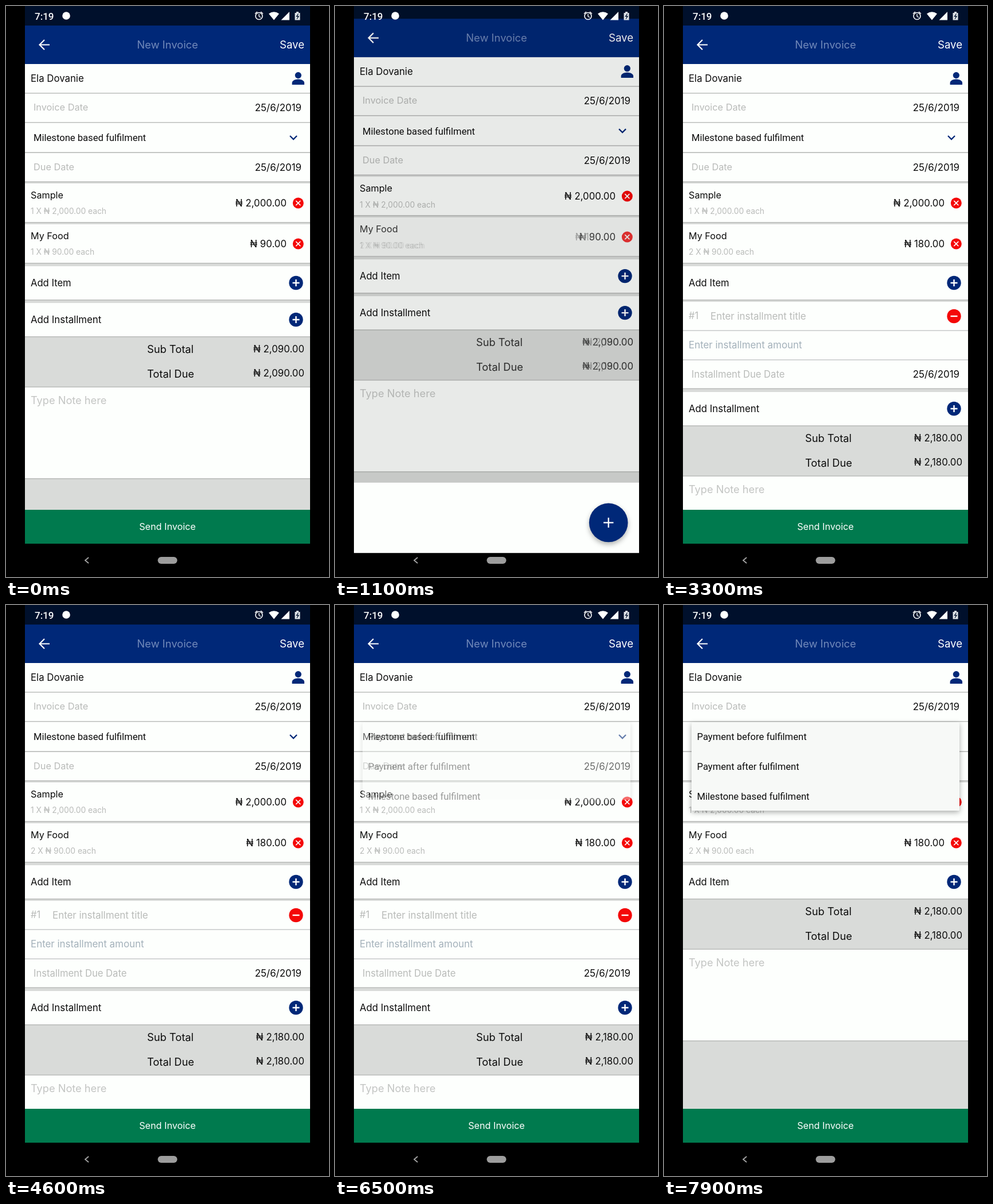
Animation of 563 by 994 pixels, one loop 8 s. Source, as an HTML page:

```html
<!DOCTYPE html>
<html lang="en">
<head>
<meta charset="utf-8">
<title>New Invoice</title>
<style>
  html, body { margin: 0; width: 100%; height: 100%; overflow: hidden; background: #000; }
  svg { display: block; width: 100vw; height: 100vh; }
  text { font-family: Inter, "Open Sans", sans-serif; white-space: pre; }
  .rb { font-family: Roboto, "Noto Sans", sans-serif; }
  .pop { filter: drop-shadow(0 3px 5px rgba(0, 0, 0, .32)); }
  .fab { filter: drop-shadow(0 4px 4px rgba(0, 0, 0, .3)); }
</style>
</head>
<body>
<svg id="stage" viewBox="0 0 563 994"></svg>
<script>
const LOOP = 8000, H = 994;
const NAVY = '#002878', RED = '#f40808', GREEN = '#007a4e', PAPER = '#fdfffd',
      GREY = '#d9dbd9', LINE = '#bcbebc', HINT = '#b9bbb9';

// --- drawing helpers, all return markup ---
const rect = (x, y, w, h, fill, more = '') =>
  `<rect x="${x}" y="${y}" width="${w}" height="${h}" fill="${fill}" ${more}/>`;
const disc = (x, y, r, fill) => `<circle cx="${x}" cy="${y}" r="${r}" fill="${fill}"/>`;
const line = (d, color, w, more = '') =>
  `<path d="${d}" fill="none" stroke="${color}" stroke-width="${w}" ${more}/>`;
const group = (id, body, more = '') => `<g id="${id}" ${more}>${body}</g>`;
// cy is the middle of the capital letters
const text = (x, cy, s, size = 16.6, fill = '#0c0c0c', anchor = 'start', more = '') =>
  `<text x="${x}" y="${(cy + size * .36).toFixed(2)}" font-size="${size}" fill="${fill}" text-anchor="${anchor}" ${more}>${s}</text>`;
const right = (x, cy, s, size) => text(x, cy, s, size, '#0c0c0c', 'end');
const roboto = (x, cy, s, id = '') => text(x, cy, s, 16.6, '#0c0c0c', 'start', `class="rb" ${id}`);
const row = (y, h, edge = LINE) => rect(33, y, 497, h, PAPER) + rect(33, y + h, 497, 1.6, edge);

const arrow = cy => line(`M76 ${cy}H59M67 ${cy - 8.5}L58.5 ${cy}L67 ${cy + 8.5}`, '#fff', 2.2);
const plus = cy => disc(505.5, cy, 12.2, NAVY) +
  line(`M499.5 ${cy}h12M505.5 ${cy - 6}v12`, '#fff', 2.4);
const minus = cy => disc(505.5, cy, 12.2, RED) + line(`M499.5 ${cy}h12`, '#fff', 2.4);
const cross = cy => disc(509.3, cy, 9.5, RED) +
  line(`M505.3 ${cy - 4}l8 8m0 -8l-8 8`, '#fff', 1.7);

const item = (y, name, detail, price) => row(y, 67) +
  text(43, y + 20, name, 16.2) + text(43, y + 48.5, detail, 13.8, HINT) +
  right(489, y + 33.5, price, 16.8) + cross(y + 34);

const sums = amount =>
  text(246, 597.5, 'Sub Total', 18.3) + text(246, 640.5, 'Total Due', 18.3) +
  right(520, 596.5, amount, 16.8) + right(520, 639, amount, 16.8);

const topBar = rect(33, 0, 497, 34, '#00102c') + rect(33, 34, 497, 67, NAVY) + arrow(67.5);

const CHOICES = ['Payment before fulfilment', 'Payment after fulfilment', 'Milestone based fulfilment'];

const invoice =
  rect(33, 101, 497, 835, GREY) +
  group('tail',
    rect(33, 576, 497, 87, GREY) + group('sumOld', sums('₦ 2,090.00')) + group('sumNew', sums('₦ 2,180.00')) +
    rect(33, 662.5, 497, 1.8, LINE) + row(664, 158) + text(43, 686, 'Type Note here', 18.2, '#c3c5c3')) +
  group('plan',
    rect(33, 512, 497, 155, GREY) +
    row(515, 49, '#d3d6d6') + text(43, 539.5, '#1', 16.6, HINT) +
    text(81, 539.5, 'Enter installment title', 16.9, HINT) + minus(540) +
    row(566, 49, '#d3d6d6') + text(43, 590, 'Enter installment amount', 16.9, '#a3b0ba') +
    row(617, 48.5) + text(48, 641, 'Installment Due Date', 16.6, HINT) + right(515, 641, '25/6/2019', 16.9)) +
  group('adder', rect(33, 512, 497, 5, GREY) + row(517, 58) + text(43, 546, 'Add Installment', 16.8) + plus(546)) +
  row(101, 50) + text(43, 126, 'Ela Dovanie', 16.8) +
  disc(509.3, 120.6, 5.6, NAVY) +
  `<path d="M498.6 137v-3c0-4.400 6-6.400 10.700-6.400s10.700 2 10.700 6.400v3z" fill="${NAVY}"/>` +
  row(152.6, 49.4) + text(48, 176.5, 'Invoice Date', 16.3, HINT) + right(515, 176.5, '25/6/2019', 16.9) +
  row(203.6, 50.8) + roboto(48, 229.500, CHOICES[2], 'id="choice"') +
  line('M495 226l6 6l6 -6', NAVY, 2.3) +
  row(256, 49.4) + text(48, 280.5, 'Due Date', 16.3, HINT) + right(515, 280.5, '25/6/2019', 16.9) +
  item(309, 'Sample', '1 X ₦ 2,000.00 each', '₦ 2,000.00') +
  group('foodOld', item(380, 'My Food', '1 X ₦ 90.00 each', '₦ 90.00')) +
  group('foodNew', item(380, 'My Food', '2 X ₦ 90.00 each', '₦ 180.00')) +
  row(453, 58) + text(43, 482, 'Add Item', 16.6) + plus(482) +
  group('send', rect(33, 877, 497, 59, GREEN) + text(281.5, 906, 'Send Invoice', 16.2, '#fff', 'middle')) +
  topBar + text(281.500, 67.5, 'New Invoice', 18.4, '#7189ba', 'middle') +
  text(520, 67.5, 'Save', 18.6, '#fff', 'end');

const popup =
  rect(48, 204, 467, 154, '#f7f9f7', 'rx="1.5"') +
  `<g clip-path="url(#rowClip)">${`<circle id="ripple" cx="282" fill="#000" fill-opacity=".07"/>`}</g>` +
  CHOICES.map((s, i) => roboto(57.5, 229.5 + i * 52, s)).join('');

const picker = topBar + rect(33, 101, 497, 835, PAPER) +
  `<g class="fab">${disc(476.7, 883, 33.8, NAVY)}</g>` + line('M468 883h17.400M476.700 874.300v17.400', '#fff', 2.3);

const system =
  text(50, 17.5, '7:19', 17, '#fff', 'start', 'class="rb" font-weight="500"') + disc(105, 17, 6.8, '#fff') +
  `<circle cx="441" cy="17.500" r="6" fill="none" stroke="#fff" stroke-width="1.600"/>` +
  line('M441 14v4l3 2M434 13.500l4 -3.400M448 13.500l-4 -3.400', '#fff', 1.4) +
  '<path d="M458 13.500q9 -6.500 18 0l-9 11zM494 10v14.500h-14.500z" fill="#fff"/>' +
  '<path d="M506 10h4v2h2.500v12.500h-9v-12.500h2.500z" fill="#dfe3e8"/>' +
  line('M509.500 13.500l-3 4.500h3.500l-3 4.500', '#00102c', 1.3) +
  line('M144 960l-6 5l6 5', '#a6a6a6', 1.8) +
  rect(264.5, 959, 34, 12, '#9d9d9d', 'rx="6"');

document.getElementById('stage').innerHTML =
  `<defs>
    <clipPath id="screen">${rect(33, 0, 497, 936, '#000')}</clipPath>
    <clipPath id="pageClip">${rect(33, 0, 497, 936, '#000', 'id="pageEdge"')}</clipPath>
    <clipPath id="popClip">${rect(30, 196, 503, 0, '#000', 'id="popEdge"')}</clipPath>
    <clipPath id="rowClip">${rect(48, 0, 467, 51.5, '#000', 'id="rowEdge"')}</clipPath>
  </defs>` +
  rect(0, 0, 563, H, '#000') +
  group('base', `<g clip-path="url(#screen)">${invoice}</g>` +
    `<g id="popBox" clip-path="url(#popClip)"><g class="pop">${popup}</g></g>` +
    rect(33, 0, 497, 936, '#000', 'id="dim"')) +
  group('page', `<g clip-path="url(#pageClip)">${picker}</g>`) +
  system;

// --- timing ---
const clamp = v => Math.min(1, Math.max(0, v));
const span = (t, a, b) => clamp((t - a) / (b - a));
const wave = p => (1 - Math.cos(Math.PI * p)) / 2;
const cubic = (a, b, c, d, s) => {
  const r = 1 - s;
  return a * r * r * r + 3 * b * s * r * r + 3 * c * s * s * r + d * s * s * s;
};
function curve(xs, ys, x) {
  let lo = 0, hi = 1;
  for (let i = 0; i < 24; i++) {
    const mid = (lo + hi) / 2;
    if (cubic(...xs, mid) < x) lo = mid; else hi = mid;
  }
  return cubic(...ys, lo);
}
const standard = p => curve([0, .4, .2, 1], [0, 0, 1, 1], p);
const sharp = p => p < 1 / 6
  ? curve([0, .05, .1333, .16667], [0, 0, .06, .4], p)
  : curve([.16667, .20833, .25, 1], [.4, .82, 1, 1], p);

const el = id => document.getElementById(id);
const set = (id, attrs) => { for (const k in attrs) el(id).setAttribute(k, attrs[k]); };
const fade = (id, v) => set(id, { opacity: v, visibility: v > 0 ? 'visible' : 'hidden' });
const shift = (id, y) => set(id, { transform: `translate(0 ${y})` });

// open start, open end, close start, close end, tap time, tapped row
const MENUS = [
  [4590, 4840, 5700, 5920, 5510, 2],
  [6390, 6640, 7040, 7260, 6960, 0],
  [7660, 7880, 9000, 9100, 9000, 0]
];

function drawPage(t) {
  const opening = t < 700;
  const p = opening ? span(t, 90, 515) : span(t, 968, 1393);
  const cover = opening ? standard(p) : 1 - standard(p);
  const top = .959 * H * (opening ? 1 - sharp(p) : sharp(p));
  const shown = t > 90 && t < 1393;
  shift('base', -.02 * H * cover);
  fade('dim', .1 * (1 - (1 - cover) ** 2));
  fade('page', shown ? 1 : 0);
  shift('page', .041 * H * (1 - cover));
  set('pageEdge', { y: top, height: Math.max(0, 936 - top) });
}

function drawForm(t) {
  const swap = wave(span(t, 990, 1290));
  for (const part of ['food', 'sum']) {
    fade(part + 'Old', 1 - swap);
    fade(part + 'New', swap);
  }
  const grow = wave(span(t, 2960, 3260));
  const shrink = wave(span(t, 7180, 7480));
  const listed = t < 7180;
  shift('adder', 155 * grow);
  shift('tail', 155 * grow - 219 * shrink);
  fade('plan', listed ? grow : 0);
  fade('adder', listed ? 1 : 0);
  el('choice').textContent = CHOICES[listed ? 2 : 0];
}

function drawMenu(t) {
  const menu = MENUS.find(m => t >= m[0] && t < m[3]);
  if (!menu) return fade('popBox', 0);
  const [a, b, c, d, tap, index] = menu;
  const open = span(t, a, b);
  fade('popBox', Math.min(wave(open), 1 - span(t, c, d)));
  set('popEdge', { height: 60 + 120 * standard(open) });
  const y = 204 + index * 51.5;
  set('rowEdge', { y });
  set('ripple', { cy: y + 25.7, r: t < tap ? 0 : 148 * (t - tap) / 90 });
}

function frame(now) {
  const t = now % LOOP;
  drawPage(t);
  drawForm(t);
  drawMenu(t);
}
const start = performance.now();
function tick() {
  frame(performance.now() - start);
  requestAnimationFrame(tick);
}
tick();
</script>
</body>
</html>
```
